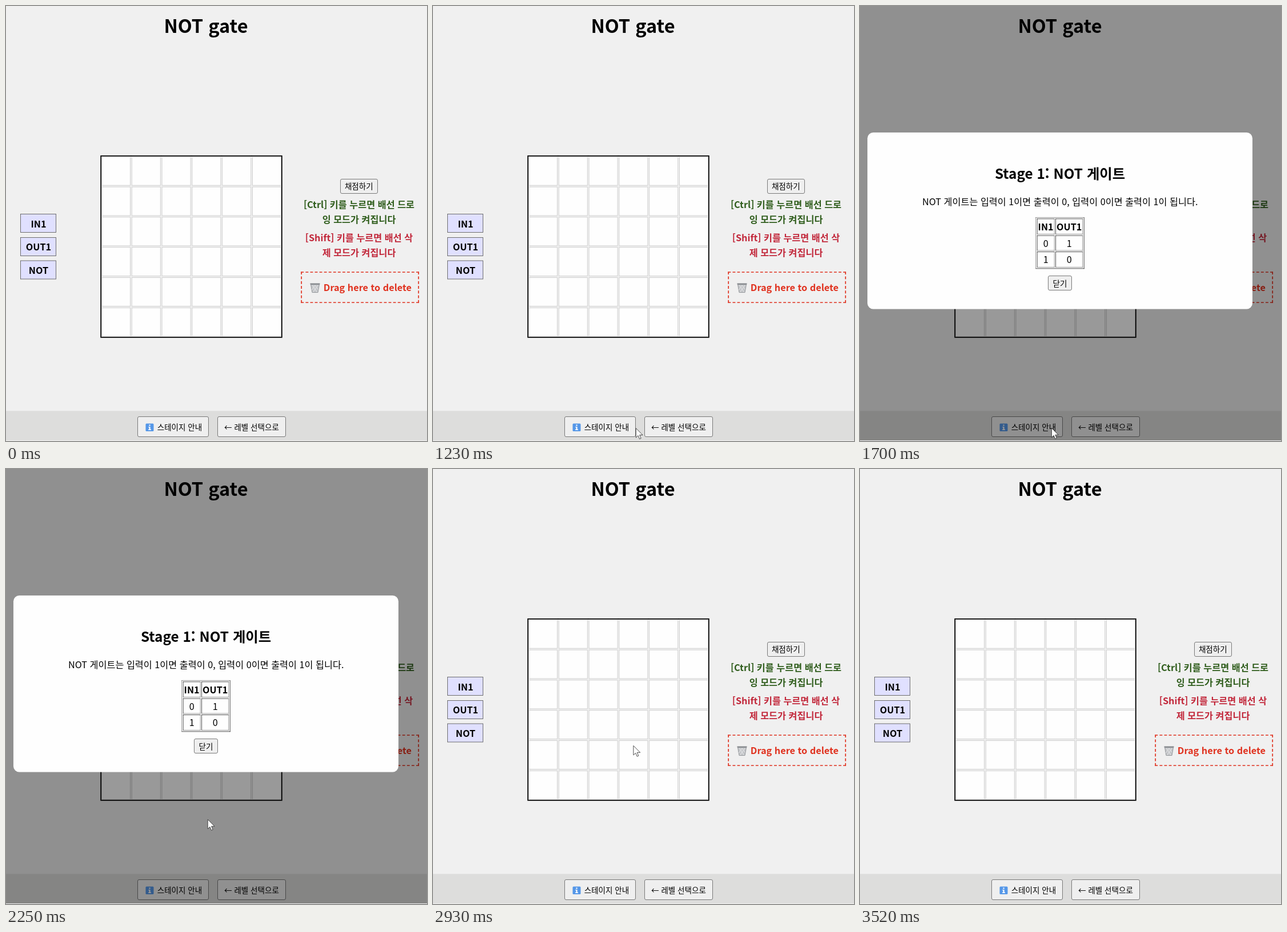
Recreate the animation shown at these times as an HTML page. Size 737x760 px, loop 4 s.

```html
<!DOCTYPE html>
<html lang="ko">
<head>
<meta charset="utf-8">
<title>NOT gate</title>
<style>
html, body { margin: 0; width: 100%; height: 100%; overflow: hidden; background: #f0f0f0; }
body { position: relative; font: 16.25px "Noto Sans CJK KR", "Noto Sans CJK", "Noto Sans KR", sans-serif; }
svg { position: absolute; left: 0; top: 0; width: 737px; height: 760px; }
text { text-anchor: middle; white-space: pre; }
.b { font-weight: 700; }
.start { text-anchor: start; }
.part rect, .btn rect { stroke-width: .9; }
.part rect { fill: #e0e0ff; stroke: #606060; }
.btn rect { fill: #efefef; stroke: #6c6c6c; }
.btn text { font-size: 13.54px; }
.btn.hover rect { fill: #e5e5e5; stroke: #4f4f4f; }
.btn.down rect { fill: #f5f5f5; stroke: #8d8d8d; }
.green { fill: #2f5d1c; }
.red { fill: #c2283b; }
.drop { fill: none; stroke: #e0321f; stroke-width: 1.7; }
/* laid out at 1.25 device pixels, then scaled to the stage */
table {
  position: absolute; left: 350px; top: 368.6px;
  transform: scale(.8125) translateX(-50%); transform-origin: 0 0;
  text-align: center; font-size: 20px; color: #000; border-spacing: 2.5px;
}
td, th { padding: 1.25px; }
</style>
</head>
<body>
<svg viewBox="0 0 737 760">
  <rect y="707.5" width="737" height="51.5" fill="#dddddc"/>
  <text class="b" x="350" y="46.5" font-size="32.5">NOT gate</text>

  <g class="part b">
    <rect x="25.5" y="363.5" width="62" height="32"/><text x="57" y="386.7">IN1</text>
    <rect x="25.5" y="404.5" width="62" height="32"/><text x="57" y="427.4">OUT1</text>
    <rect x="25.5" y="445" width="62" height="32"/><text x="57" y="468">NOT</text>
  </g>

  <rect x="166.2" y="262" width="316.6" height="316.8" fill="none" stroke="#000" stroke-width="1.8"/>
  <g id="cells" fill="#fefefe" stroke="#ccc" stroke-width=".9"></g>

  <g class="btn"><rect x="585.5" y="302.5" width="65" height="25" rx="2.5"/><text x="617.8" y="320.1">채점하기</text></g>
  <g class="b green">
    <text x="618" y="353">[Ctrl] 키를 누르면 배선 드로</text>
    <text x="618" y="379">잉 모드가 켜집니다</text>
  </g>
  <g class="b red">
    <text x="618" y="411">[Shift] 키를 누르면 배선 삭</text>
    <text x="618" y="437">제 모드가 켜집니다</text>
  </g>

  <g class="drop">
    <path d="M516.4 465H723M516.4 518H723" stroke-dasharray="4.875 3.19"/>
    <path d="M517.2 464.2V518.8M722.2 464.2V518.8" stroke-dasharray="4.875 3.4"/>
  </g>
  <g stroke-linejoin="round">
    <path d="M533.5 486.5H548.5L546 500.5H536Z" fill="#c3c5c8" stroke="#95989c"/>
    <path d="M536.5 488L544.5 500M541 488L546 495M546 488L537.5 500M541 488L535.5 496" stroke="#e6e7e9" fill="none"/>
    <path d="M532.5 485.5H549.5" stroke="#83868a" stroke-width="2"/>
  </g>
  <text class="b start" x="555.8" y="498.2" fill="#e0321f">Drag here to delete</text>

  <g class="btn" id="info">
    <rect x="230.5" y="717.5" width="124" height="35" rx="2.5"/>
    <text class="start" x="264.7" y="741">스테이지 안내</text>
    <path d="M246 729.5H257Q258.5 729.5 258.5 731V741.5Q258.5 743 257 743H246Q244.5 743 244.5 741.5V731Q244.5 729.5 246 729.5Z" fill="#5597e8"/>
    <path d="M250.3 731.5H252.7V733.6H250.3ZM249.3 735H252.6V739.6H254V741H249.1V739.6H250.5V736.3H249.3Z" fill="#fff"/>
  </g>
  <g class="btn" id="back">
    <rect x="370.5" y="717.5" width="119" height="35" rx="2.5"/>
    <text x="430" y="741">← 레벨 선택으로</text>
  </g>
</svg>

<div id="modal" hidden>
  <svg viewBox="0 0 737 760">
    <rect width="737" height="759" fill="#000" opacity=".4"/>
    <rect x="13" y="221" width="674" height="308.5" rx="10.2" fill="#fefefe"/>
    <text class="b" x="350" y="302" font-size="24.375">Stage 1: NOT 게이트</text>
    <text x="350.2" y="347.8">NOT 게이트는 입력이 1이면 출력이 0, 입력이 0이면 출력이 1이 됩니다.</text>
    <g class="btn" id="close">
      <rect x="329.5" y="471.5" width="41" height="25" rx="2.5"/><text x="350" y="489.8">닫기</text>
    </g>
  </svg>
  <table border="1">
    <tr><th>IN1</th><th>OUT1</th></tr>
    <tr><td>0</td><td>1</td></tr>
    <tr><td>1</td><td>0</td></tr>
  </table>
</div>

<svg viewBox="0 0 737 760">
  <g id="cursor">
    <path d="M.4 .4V16.8L4.2 13.3L6.7 19.2L9.3 18.1L6.8 12.3H12.2Z" fill="#fff" stroke="#222" stroke-width=".8"/>
    <circle id="click" r="12" fill="#fff22c" opacity=".62"/>
  </g>
</svg>

<script>
const LOOP = 4000;
const $ = id => document.getElementById(id);

function drawCells() {
  const pitch = 52.8, size = 50;
  let out = '';
  for (let row = 0; row < 6; row++) {
    for (let col = 0; col < 6; col++) {
      out += `<rect x="${167.5 + pitch * col}" y="${263.3 + pitch * row}" width="${size}" height="${size}"/>`;
    }
  }
  $('cells').innerHTML = out;
}

// Cursor moves: time span, number of intervals, easing and Bezier points
const moves = [
  { from: 850, to: 1350, n: 16, ease: u => 1 - (1 - u) ** 2,
    pts: [[693, 751], [560, 745], [440, 738], [335, 737]] },
  { from: 1900, to: 1900, n: 1, ease: u => u,
    pts: [[320, 733], [320, 733], [320, 733], [320, 733]] },
  { from: 2009, to: 2510, n: 16, ease: u => u * u * (3 - 2 * u),
    pts: [[320, 733], [345, 650], [388, 500], [350.5, 483]] },
  { from: 3054, to: 3520, n: 13, ease: u => u ** 1.6,
    pts: [[350.5, 483], [420, 560], [520, 670], [604, 764]] }
];

function bezier(p, u) {
  const v = 1 - u;
  return [0, 1].map(k =>
    v * v * v * p[0][k] + 3 * v * v * u * p[1][k] + 3 * v * u * u * p[2][k] + u * u * u * p[3][k]);
}

function cursorAt(t) {
  const m = moves.filter(m => t >= m.from).pop();
  if (!m || t >= 3520) return null;
  const u = m.to > m.from ? Math.min(1, (t - m.from) / (m.to - m.from)) : 1;
  return bezier(m.pts, m.ease(Math.floor(u * m.n + 1e-6) / m.n));
}

function setButton(id, pos, active, down) {
  const r = $(id).querySelector('rect');
  const at = k => +r.getAttribute(k);
  const over = active && pos &&
    pos[0] >= at('x') && pos[0] <= at('x') + at('width') &&
    pos[1] >= at('y') && pos[1] <= at('y') + at('height');
  $(id).classList.toggle('hover', !!over);
  $(id).classList.toggle('down', !!(over && down));
}

function render(t) {
  const pos = cursorAt(t);
  const open = t >= 1700 && t < 2930;
  const down = (t >= 1590 && t < 1700) || (t >= 2820 && t < 2930);
  $('modal').hidden = !open;
  $('cursor').style.display = pos ? '' : 'none';
  if (pos) $('cursor').setAttribute('transform', `translate(${pos[0]} ${pos[1]})`);
  $('click').style.display = down ? '' : 'none';
  setButton('info', pos, !open, down);
  setButton('back', pos, !open, down);
  setButton('close', pos, open, down);
}

drawCells();
const start = performance.now();
function tick() {
  render((performance.now() - start) % LOOP);
  requestAnimationFrame(tick);
}
tick();
</script>
</body>
</html>
```
